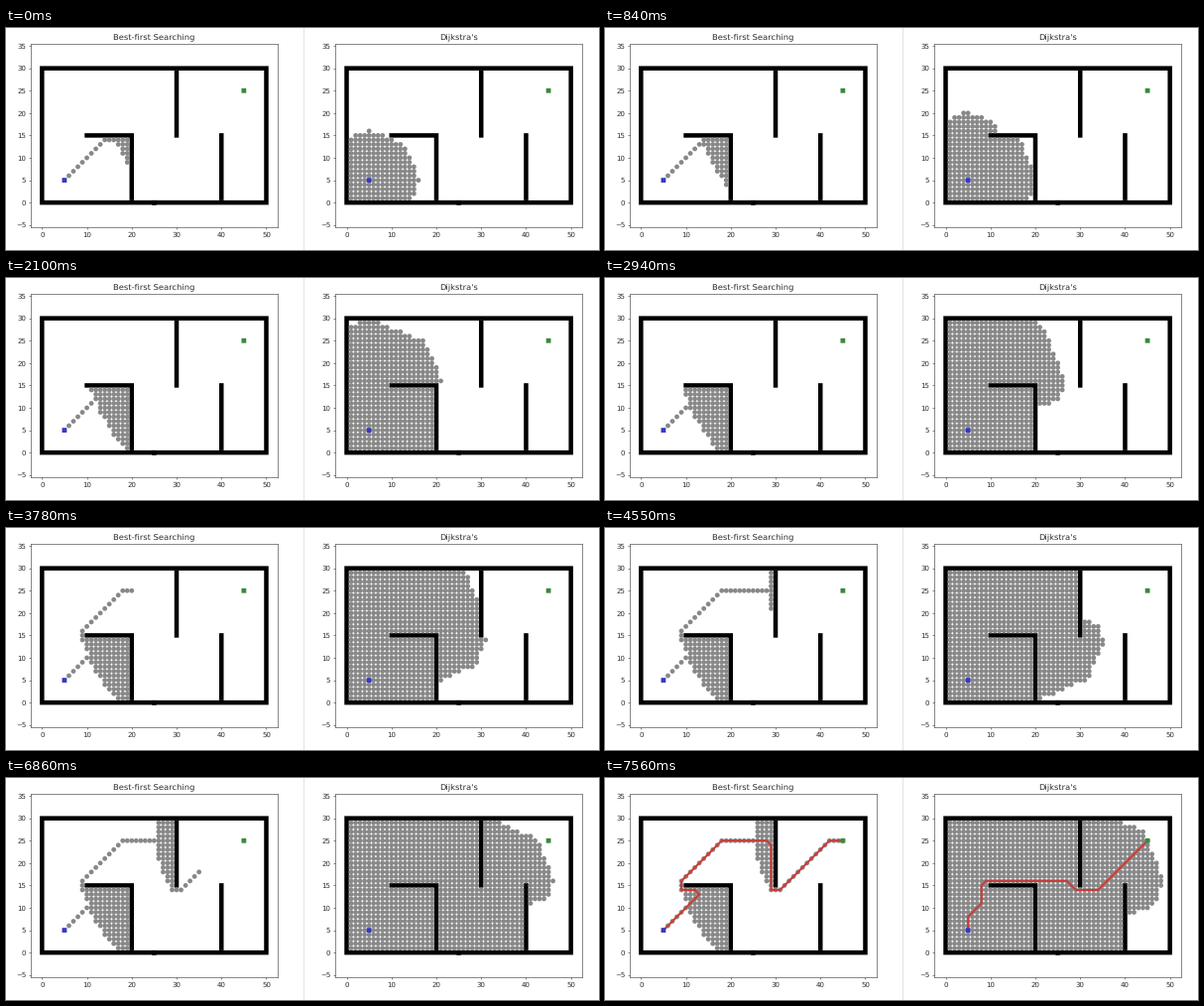
A matplotlib script for the animation above (7.77 s loop, 598x224 px).

```python
import math

import matplotlib.pyplot as plt
from matplotlib.animation import FuncAnimation
from matplotlib.collections import PathCollection
from matplotlib.patches import Rectangle
from matplotlib.path import Path

INK = "#2b2b2b"
plt.rcParams.update({
    "font.family": "DejaVu Sans", "text.hinting": "none",
    "text.color": INK, "axes.edgecolor": INK,
    "xtick.color": INK, "ytick.color": INK,
})

W, H, DPI = 598, 224, 50
FRAMES, INTERVAL = 111, 70
FINISH = 108        # both searches are done and their paths appear
START, GOAL = (5, 5), (45, 25)
RADIUS = 0.53       # of a dot, in cells

WALL_LINES = [
    [(25, 0), (50, 0), (50, 30), (0, 30), (0, 0), (25, 0)],
    [(10, 15), (20, 15), (20, 1)],
    [(30, 29), (30, 15)],
    [(40, 1), (40, 15)],
]


def wall_cells():
    cells = set()
    for line in WALL_LINES:
        for (x0, y0), (x1, y1) in zip(line, line[1:]):
            n = max(abs(x1 - x0), abs(y1 - y0))
            cells |= {(x0 + (x1 - x0) * k // n, y0 + (y1 - y0) * k // n)
                      for k in range(n + 1)}
    return cells


WALLS = wall_cells()


def neighbors(cell):
    """Free neighbours; diagonal moves may not cut wall corners."""
    x, y = cell
    for dx in (-1, 0, 1):
        for dy in (-1, 0, 1):
            steps = {(x + dx, y + dy), (x + dx, y), (x, y + dy)}
            if (dx or dy) and not steps & WALLS:
                yield (x + dx, y + dy), math.hypot(dx, dy)


def search(greedy):
    """Return the cells in the order they are closed, and the path found."""
    cost, parent = {START: 0}, {START: None}
    queue = {(0, START)}
    closed = {}
    while GOAL not in closed:
        item = min(queue)
        queue.remove(item)
        cell = item[1]
        closed[cell] = True
        for nxt, step in neighbors(cell):
            new = cost[cell] + step
            if nxt not in parent or (not greedy and new < cost[nxt]):
                cost[nxt], parent[nxt] = new, cell
                queue.add((math.dist(nxt, GOAL) if greedy else new, nxt))

    route = [GOAL]
    while parent[route[-1]]:
        route.append(parent[route[-1]])
    return list(closed)[1:], route


class Panel:
    def __init__(self, fig, left, title, greedy, pace):
        self.pace = pace
        order, route = search(greedy)
        self.discs = [Path.circle(c, RADIUS) for c in order]

        ax = fig.add_axes([left / W, 1 - 201 / H, 248.8 / W, 185.2 / H])
        ax.set(xlim=(-2.5, 52.5), ylim=(-5.5, 35.5),
               xticks=range(0, 51, 10), yticks=range(-5, 36, 5))
        ax.set_title(title)
        for line in WALL_LINES:
            ax.plot(*zip(*line), color="black", lw=6.5, snap=False,
                    solid_capstyle="projecting", solid_joinstyle="miter")

        self.dots = PathCollection([], color="#888888", lw=0, zorder=2.5,
                                   transform=ax.transData)
        ax.add_collection(self.dots, autolim=False)
        self.route, = ax.plot(*zip(*route), color="#cc3a36", lw=3, zorder=3)
        for (x, y), color in ((START, "#3838bc"), (GOAL, "#3a8a3a")):
            ax.add_patch(Rectangle((x - RADIUS, y - RADIUS), 2 * RADIUS,
                                   2 * RADIUS, color=color, lw=0,
                                   snap=False, zorder=4))

    def show(self, frame):
        done = frame >= FINISH
        n = len(self.discs) if done else self.pace(frame)
        self.dots.set_paths(self.discs[:n])
        self.route.set_visible(done)


# Plotting slows down as dots pile up.
def best_first_pace(t):
    return round(23 + 2.11 * t - 0.0047 * t ** 2)


def dijkstra_pace(t):
    batch = 25
    return 203 + batch * int((10.3 * t - 3.7e-5 * t ** 3) // batch)


fig = plt.figure(figsize=(W / DPI, H / DPI), dpi=DPI, facecolor="white")
panels = [
    Panel(fig, 25, "Best-first Searching", True, best_first_pace),
    Panel(fig, 332.2, "Dijkstra's", False, dijkstra_pace),
]
fig.add_artist(plt.Line2D([299.5 / W] * 2, [0, 1], color="#e2e2e2", lw=1.4))


def draw(frame):
    for panel in panels:
        panel.show(frame)
    return []


anim = FuncAnimation(fig, draw, frames=FRAMES, interval=INTERVAL, repeat=True)
plt.show()
```
